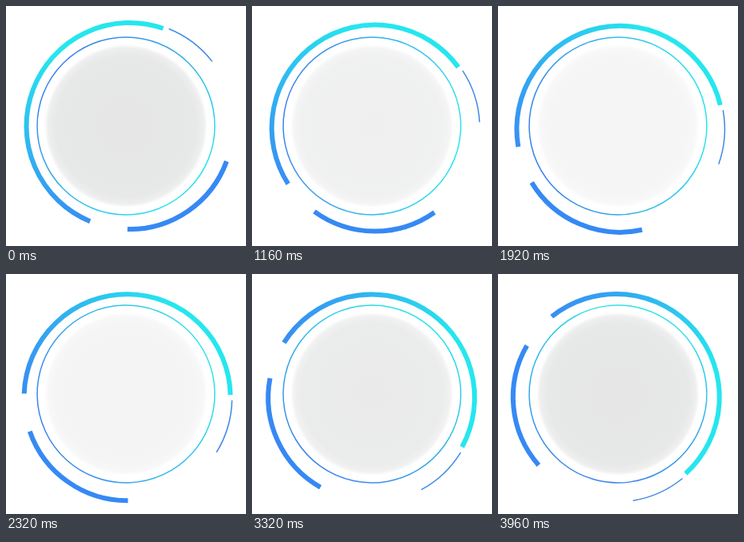
An HTML page that plays this animation: 300x300 px, repeating every 4 s.

```html
<!DOCTYPE html>
<html lang="en">
<head>
<meta charset="utf-8">
<title>Rotating rings</title>
<style>
  html, body { margin: 0; width: 100%; height: 100%; overflow: hidden; background: #fff; }
  svg { display: block; width: 100%; height: 100%; }
</style>
</head>
<body>
<svg viewBox="0 0 300 300" fill="none">
  <defs>
    <linearGradient id="sweep" gradientUnits="userSpaceOnUse" x1="150" y1="60" x2="150" y2="274">
      <stop stop-color="#26e6ee"/>
      <stop offset="1" stop-color="#388df3"/>
    </linearGradient>
    <linearGradient id="hair" gradientUnits="userSpaceOnUse" x1="72" y1="72" x2="228" y2="228">
      <stop stop-color="#3d84ea"/>
      <stop offset="1" stop-color="#2ce3ec"/>
    </linearGradient>
    <radialGradient id="glow">
      <stop offset="0" stop-color="#e6e6e6"/>
      <stop offset=".87" stop-color="#e7e8e8"/>
      <stop offset=".96" stop-color="#eeeeee"/>
      <stop offset="1" stop-color="#fafafa"/>
    </radialGradient>
  </defs>
  <circle id="disc" cx="150" cy="150" r="101" fill="url(#glow)"/>
  <circle id="ring" cx="150" cy="150" r="111" stroke="url(#hair)" stroke-width="1.5"/>
  <g id="arcs">
    <path id="long" stroke="url(#sweep)" stroke-width="6"/>
    <path id="short" stroke="#3689f4" stroke-width="6"/>
    <path id="thin" stroke="#3f8ae6" stroke-width="1.5"/>
  </g>
</svg>
<script>
  const LOOP = 4000, STEP = 40, TURN = 120;
  const el = id => document.getElementById(id);
  const disc = el('disc'), ring = el('ring'), arcs = el('arcs');

  // Arcs share a centre slightly right of the pivot, so they wobble as they turn.
  const CX = 154.5, CY = 150;

  // Angles in degrees, clockwise from the top.
  function arc(r, from, to) {
    const at = deg => {
      const a = deg * Math.PI / 180;
      return `${(CX + r * Math.sin(a)).toFixed(2)} ${(CY - r * Math.cos(a)).toFixed(2)}`;
    };
    return `M${at(from)}A${r} ${r} 0 ${to - from > 180 ? 1 : 0} 1 ${at(to)}`;
  }

  el('long').setAttribute('d', arc(129, 202.5, 379));
  el('short').setAttribute('d', arc(129, 110, 181.2));
  el('thin').setAttribute('d', arc(131, 22, 52));

  const rotate = (node, deg) => node.setAttribute('transform', `rotate(${deg} 150 150)`);

  function draw(now) {
    const t = Math.floor(now % LOOP / STEP) * STEP / LOOP;
    rotate(arcs, TURN * t);
    rotate(ring, -TURN * t);
    disc.setAttribute('opacity', 0.7 + 0.3 * Math.cos(2 * Math.PI * t));
  }

  const start = performance.now();
  function tick() {
    draw(performance.now() - start);
    requestAnimationFrame(tick);
  }
  tick();
</script>
</body>
</html>
```
